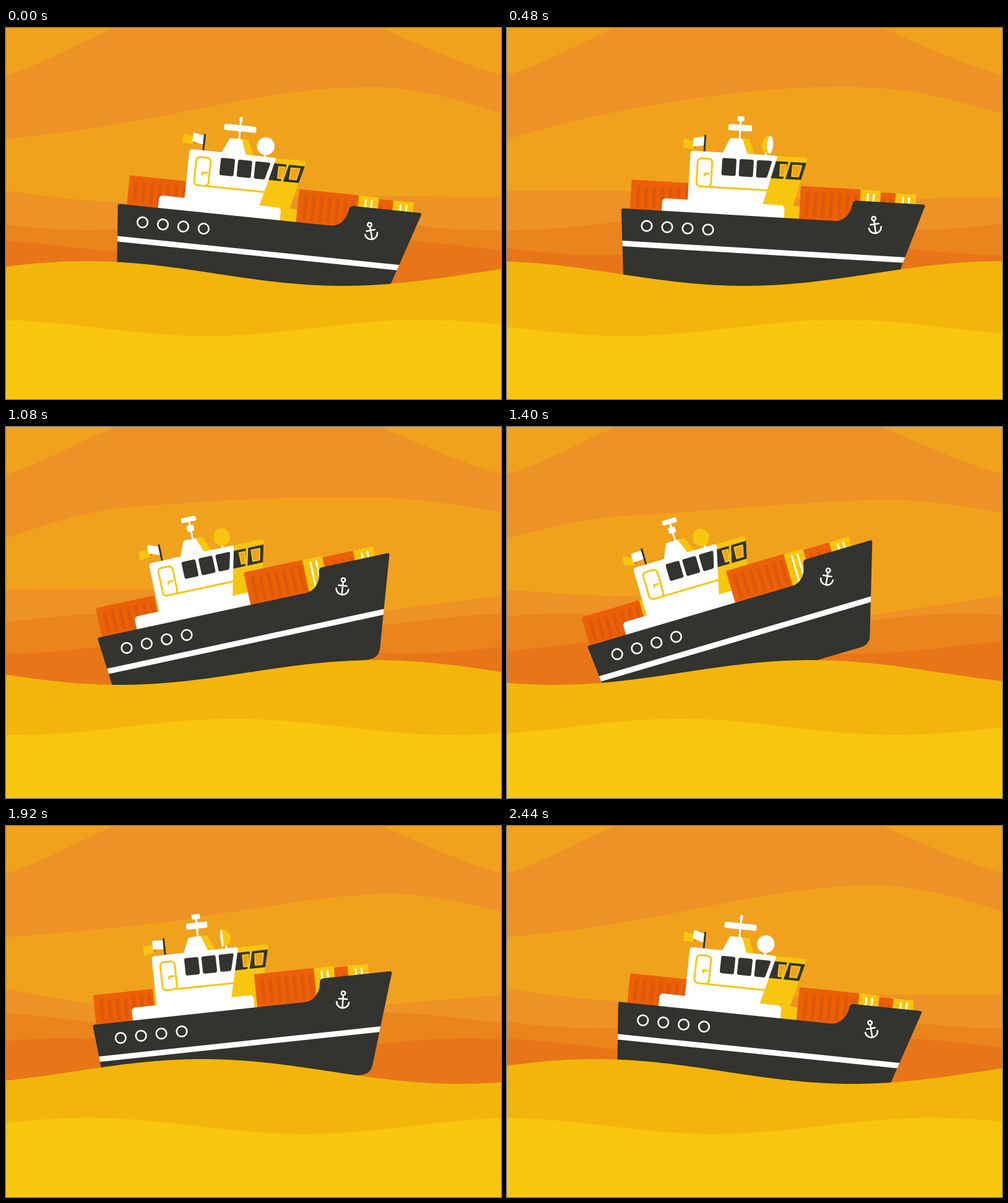
Recreate the animation shown at these times as an HTML page with a canvas. Size 800 by 600 pixels, loop 2480 ms.

```html
<!DOCTYPE html>
<html lang="en">
<head>
<meta charset="utf-8">
<title>Cargo ship at sea</title>
<style>
  html, body { margin: 0; width: 100%; height: 100%; overflow: hidden; background: #f8c60e; }
  canvas { display: block; width: 800px; height: 600px; }
</style>
</head>
<body>
<canvas id="stage" width="800" height="600"></canvas>
<script>
const c = document.getElementById('stage').getContext('2d');
const LOOP = 2480, STEP = 40, TAU = Math.PI * 2;
const SKY = '#f0a21c', HAZE = '#ed9226', DUSK = '#ea841d', GLOW = '#e87619';
const SEA = '#f3b50b', YELLOW = '#f8c60e', DARK = '#33332f', WHITE = '#fff';
const ORANGE = '#ec6008', RUST = '#de590a';

// time, x, tilt, anchor swing, front cargo, bow cargo, stern cargo
const KEYS = [
  [0, 355, 5.87, -10, 289, 442.3, 14.3],
  [480, 361.3, 3.4, -8, 287.3, 441, 13.7],
  [760, 352.4, -4, -7, 279.4, 439.5, 11.3],
  [1080, 331.4, -12.16, 6, 253, 433.4, 7.2],
  [1400, 313, -16.4, 9, 249, 422, 4],
  [1720, 308.3, -14.55, 7, 250.7, 416.2, 2.9],
  [2120, 340, 2.6, -1, 285, 426.2, 9.4],
  [2440, 354, 5.88, -9, 289, 442, 14.4]
];

function key(i) {
  const n = KEYS.length, turn = Math.floor(i / n), k = KEYS[i - turn * n].slice();
  k[0] += turn * LOOP;
  return k;
}

// smooth cyclic curve through the keys
function pose(t) {
  let i = KEYS.length - 1;
  while (KEYS[i][0] > t) i--;
  const [p, a, b, q] = [-1, 0, 1, 2].map(d => key(i + d));
  const slope = (l, m, r, j) => {
    const dl = m[0] - l[0], dr = r[0] - m[0];
    return ((m[j] - l[j]) / dl * dr + (r[j] - m[j]) / dr * dl) / (dl + dr);
  };
  const h = b[0] - a[0], s = (t - a[0]) / h;
  return a.slice(1).map((v, n) => {
    const j = n + 1, u = 1 - s;
    return v * u * u * (1 + 2 * s) + b[j] * s * s * (3 - 2 * s) +
      h * s * u * (slope(p, a, b, j) * u - slope(a, b, q, j) * s);
  });
}

const beat = (t, peak, cycles = 1) => Math.cos(TAU * cycles * (t - peak) / LOOP);

function fill(d, color) {
  c.fillStyle = color;
  c.fill(new Path2D(d));
}
function line(d, color, width) {
  c.strokeStyle = color;
  c.lineWidth = width;
  c.stroke(new Path2D(d));
}
function box(x, y, w, h, r, color) {
  c.fillStyle = color;
  c.beginPath();
  c.roundRect(x, y, w, h, r);
  c.fill();
}

// filled area under a travelling cosine
function wave(t, mid, amp, len, start, color) {
  const low = start - len * t / LOOP;
  let d = 'M0 600';
  for (let x = 0; x <= 800; x += 4) d += `L${x} ${mid + amp * Math.cos(TAU * (x - low) / len)}`;
  fill(d + 'L800 600Z', color);
}

// filled area under a curve with fixed ends and two moving inner nodes
function band(ya, yb, sb, yc, sc, yd, color) {
  const sa = 1.5 * (yb - ya) / 200 - sb / 2, sd = 1.5 * (yd - yc) / 200 - sc / 2;
  const nodes = [[0, ya, sa], [200, yb, sb], [600, yc, sc], [800, yd, sd]];
  let d = `M0 600L0 ${ya}`;
  for (let i = 1; i < 4; i++) {
    const [x0, y0, s0] = nodes[i - 1], [x1, y1, s1] = nodes[i], h = (x1 - x0) / 3;
    d += `C${x0 + h} ${y0 + s0 * h} ${x1 - h} ${y1 - s1 * h} ${x1} ${y1}`;
  }
  fill(d + 'L800 600Z', color);
}

function sky(t) {
  c.fillStyle = HAZE;
  c.fillRect(0, 0, 800, 600);
  fill('M0 0V77C58 59 116 25 175 0Z', SKY);
  fill('M800 0V76C738 59 670 28 607 0Z', SKY);
  band(180, 144 - 19 * beat(t, 800), -.12 - .07 * beat(t, 200),
    106 - 12 * beat(t, 190), .01 - .055 * beat(t, 1800), 138, SKY);
  band(263, 275 - 17 * beat(t, 800), .02,
    287 - 16 * beat(t, 140), -.07 + .09 * beat(t, 140), 273, HAZE);
  wave(t, 314.5, 12.5, 650, 131, DUSK);
  wave(t, 355, 12, 650, 275, GLOW);
}

function crate(x, top) {
  box(x, top, 97, 6 - top, 2, ORANGE);
  for (let i = 0; i < 7; i++) box(x + 9 + i * 13, top + 9, 6, -top - 13, 0, RUST);
}
function tank(x, top) {
  box(x, top, 33, 6 - top, 1.5, YELLOW);
  for (let y = top + 9; y < -4; y += 8) {
    box(x + 4, y, 5, 2.5, 0, SEA);
    box(x + 27, y, 4, 2.5, 0, SEA);
  }
  box(x + 11, top + 5, 3, -top, 1.5, WHITE);
  box(x + 20.5, top + 5, 3, -top, 1.5, WHITE);
}

function flag(t) {
  const a = 4.6 * beat(t, 384, 2), b = 5 + 3.2 * beat(t, 645, 2), j = a + 5;
  c.save();
  c.translate(128, -124.5);
  fill(`M-16 ${j}C-22 ${j + 2} -28 ${b - 2} -34 ${b}v14C-28 ${b + 12} -22 ${j + 15} -16 ${j + 13}Z`, YELLOW);
  fill(`M-19 ${a + 14}L-14 ${a + 13}L-15 ${j + 13}Z`, ORANGE);
  fill(`M0 0C-6 2 -13 ${a - 2} -18.5 ${a}v14.5C-13 ${a + 12.5} -6 16 0 14.5Z`, WHITE);
  c.restore();
  line('M128.3 -125.5V-99', DARK, 3);
}

function dish(t) {
  const turn = TAU * t / LOOP, face = Math.cos(turn), side = Math.sin(turn);
  const x = 228 + 6 * side, y = -117, r = 14.3;
  line('M228 -106V-98', WHITE, 3);
  c.fillStyle = YELLOW;
  c.beginPath();
  c.ellipse(x, y, r * Math.max(Math.abs(side), Math.abs(face)), r, 0, Math.PI / 2, Math.PI * 1.5, side < 0);
  c.fill();
  c.fillStyle = face > 0 ? WHITE : YELLOW;
  c.beginPath();
  c.ellipse(x, y, r * Math.abs(face), r, 0, 0, TAU);
  c.fill();
}

function mast(t) {
  const low = 31 + 21 * beat(t, 0), top = 15 - 10 * beat(t, 0);
  fill('M186 -124H199.5L210 -98H186Z', YELLOW);
  fill('M171 -124H188.5L198.5 -98H157.5L168 -122Q169 -124 171 -124Z', WHITE);
  line('M184 -122V-156', WHITE, 3);
  box(184 - low / 2, -146.5, low, 10, 2, WHITE);
  box(184 - top / 2, -160, top, 8, 2, WHITE);
}

function cabin() {
  box(255, -20.5, 60, 24, 2, YELLOW);
  fill('M230 -99.5H292Q296 -99.5 295 -95.5L276 -18H225Z', YELLOW);
  fill('M243 -91H294L287 -63H236Z', DARK);
  line('M267 -92L259.5 -62', YELLOW, 3.5);
  for (const d of ['M252.5 -86H262L258.5 -67.5H252.5Z', 'M272.5 -86H286.5L282.5 -68H271.5Z']) {
    fill(d, SKY);
    line(d, YELLOW, 2);
  }
  fill('M111 -100H242Q247 -100 246 -96L227 -18H106V-95Q106 -100 111 -100Z', WHITE);
  box(158, -91, 23, 28, 3, DARK);
  box(186, -91, 23, 28, 3, DARK);
  fill('M217 -91H235.5Q238.8 -91 238 -88L232.2 -65.5Q231.5 -63 229 -63H217Q214 -63 214 -66V-88Q214 -91 217 -91Z', DARK);
  line('M140 -43H233', YELLOW, 3);
  c.fillStyle = WHITE;
  c.strokeStyle = YELLOW;
  c.beginPath();
  c.roundRect(118.5, -88.5, 23.5, 45.5, 6);
  c.fill();
  c.stroke();
  line('M131 -61V-64.3H138', YELLOW, 3);
  box(65, -20.5, 198, 25, [6, 6, 0, 0], WHITE);
}

function anchor(angle) {
  c.save();
  c.translate(408, -7.7);
  c.rotate(angle);
  line('M0 3.2V24M-6.8 9.2H6.8M-10 14.5C-9 27 9 27 10 14.5M3.2 0A3.2 3.2 0 1 1 -3.2 0A3.2 3.2 0 1 1 3.2 0', WHITE, 2.5);
  c.restore();
}

function hull(swing) {
  const shape = new Path2D('M3 0H345C361 0 371 -15 372 -28Q372.5 -35 379 -35H486Q490.5 -35 489 -31L442.5 113Q438 126.5 424 126.5H11L0 3Q0 0 3 0Z');
  c.fillStyle = DARK;
  c.fill(shape);
  c.save();
  c.clip(shape);
  box(0, 52, 490, 9, 0, WHITE);
  c.restore();
  c.strokeStyle = WHITE;
  c.lineWidth = 2.6;
  for (let i = 0; i < 4; i++) {
    c.beginPath();
    c.arc(42.5 + 33.1 * i, 26, 8.3, 0, TAU);
    c.stroke();
  }
  anchor(swing);
}

function ship(t) {
  const [x, tilt, swing, front, bow, stern] = pose(t), rad = Math.PI / 180;
  c.save();
  c.translate(x, 342.2);
  c.rotate(tilt * rad);
  c.translate(-179, -40);
  tank(stern + 96, -47);
  crate(stern, -47.5);
  crate(bow - 97, -50.5);
  tank(bow, -50.5);
  flag(t);
  mast(t);
  dish(t);
  cabin();
  tank(front + 96.5, -53);
  crate(front, -53.5);
  hull((swing - tilt) * rad);
  c.restore();
}

function draw(now) {
  const t = Math.floor(now % LOOP / STEP) * STEP;
  c.lineCap = c.lineJoin = 'round';
  sky(t);
  ship(t);
  wave(t, 397, 20, 830, 545, SEA);
  wave(t, 485, 13, 700, 324, YELLOW);
}

const begin = performance.now();
function tick() {
  draw(performance.now() - begin);
  requestAnimationFrame(tick);
}
tick();
</script>
</body>
</html>
```
